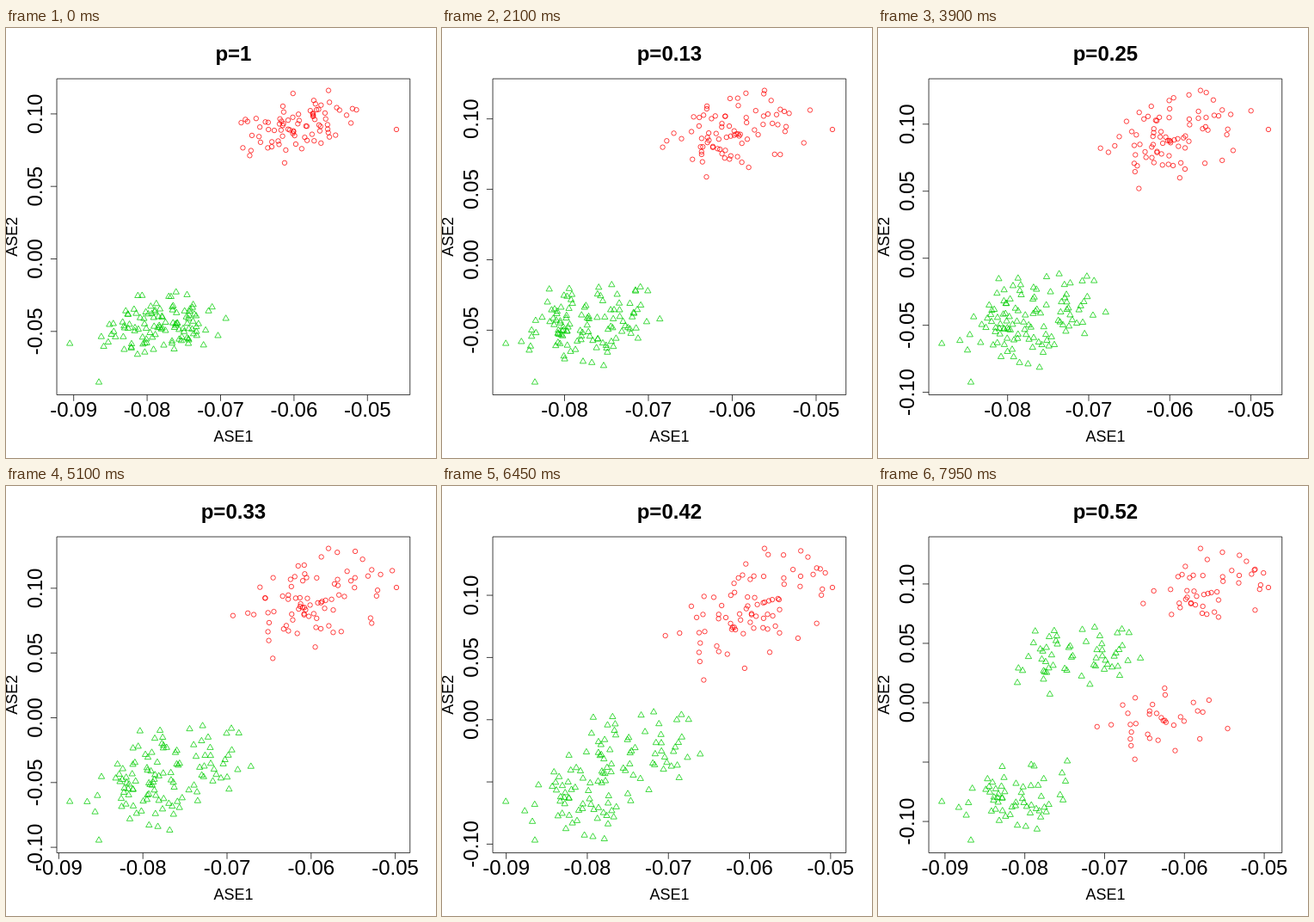
An HTML page for the animation above (8000 ms loop, 500 by 500 pixels).

```html
<!DOCTYPE html>
<html lang="en">
<head>
<meta charset="utf-8">
<title>ASE scatter plot</title>
<style>
html, body { margin: 0; height: 100%; overflow: hidden; background: #fff; }
svg { display: block; width: 100%; height: 100%; font: 24px "Liberation Sans", Arial, sans-serif; text-anchor: middle; }
path { fill: none; stroke-width: .75; }
</style>
</head>
<body>
<svg id="plot" viewBox="0 0 500 500"></svg>
<script>
const STEP = 150, LOOP = 8000;
const LEFT = 59.04, TOP = 59.04, RIGHT = 469.76, BOTTOM = 426.56;
const INSET = 15.2; // room between the outermost marks and the box
const TICK = 7.2;
const midX = (LEFT + RIGHT) / 2, midY = (TOP + BOTTOM) / 2;

// p, x of -0.07, px per 0.01, y of 0
const axisKeys = [
  [.13, 240, 97.5, 269.5], [.25, 245, 94.3, 267.7], [.33, 257, 97.8, 269.5],
  [.38, 261, 96.6, 273], [.46, 265.5, 92, 270.5], [.52, 263.5, 92.8, 252]
];

// Cluster centre in data units, share of the upper half, and its outermost marks in px
const red = { color: '#f00', x: -.0597, y: .0905, count: 80, share: .57, rim: [[454, 118], [375, 72.6]] };
const green = { color: '#00cd00', x: -.0776, y: -.0455, count: 116, share: .5, rim: [[74.2, 367], [108, 412]] };

let seed = 11;
function random() {
  seed = (seed * 1664525 + 1013904223) % 4294967296;
  return seed / 4294967296;
}

// Normal pair, cut off at about 2.3 deviations
function normalPair() {
  const r = Math.sqrt(-2 * Math.log(1 - .93 * random())), turn = 2 * Math.PI * random();
  return [r * Math.cos(turn), r * Math.sin(turn)];
}

for (const set of [red, green]) {
  set.dots = Array.from({ length: set.count }, (_, i) => ({
    side: i < set.count * set.share ? 1 : -1,
    pure: normalPair(),
    mixed: normalPair()
  }));
}

// Reflect a value back into its range
const fold = (v, lo, hi) => v < lo ? 2 * lo - v : v > hi ? 2 * hi - v : v;

function axesAt(p) {
  if (p === 1) return { x0: 249.5, xStep: 85.4, y0: 268.5, yStep: 84.3 };
  let i = 0;
  while (i < axisKeys.length - 2 && p > axisKeys[i + 1][0]) i++;
  const [a, b] = [axisKeys[i], axisKeys[i + 1]];
  const f = (p - a[0]) / (b[0] - a[0]);
  const [, x0, xStep, y0] = a.map((v, j) => v + (b[j] - v) * f);
  return { x0, xStep, y0, yStep: 86.2 - 33 * p };
}

// The second axis turns from the colour contrast to the half contrast as p passes 0.49
function points(set, p, axes) {
  const mix = p === 1 ? 0 : p;
  const turn = mix && .5 * Math.atan2(.04, .49 - mix);
  const cos = Math.cos(turn), sin = Math.sin(turn);
  const shift = .0034 * Math.min(1, (mix / .46) ** 2);
  const sd = (.011 + .02 * mix) * (1 - .4 * sin * sin);
  const cloud = set.dots.map(({ side, pure, mixed }) => {
    const [u, v] = p === 1 ? pure : mixed;
    const x = set.x + side * shift + .004 * u;
    const y = set.y * cos + side * .065 * sin + sd * (.25 * u + .97 * v);
    return [
      fold(axes.x0 + (x + .07) / .01 * axes.xStep, LEFT + INSET, RIGHT - INSET),
      fold(axes.y0 - y / .05 * axes.yStep, TOP + INSET, BOTTOM - INSET)
    ];
  });
  return cloud.concat(set.rim);
}

const circle = 'm-2.7 0a2.7 2.7 0 1 0 5.4 0a2.7 2.7 0 1 0-5.4 0';
const triangle = 'm0-4.2l3.64 6.3h-7.28z';
const line = (color, d) => `<path stroke="${color}" d="${d}"/>`;
const marks = (set, shape, p, axes) => line(set.color,
  points(set, p, axes).map(([x, y]) => `M${x.toFixed(2)} ${y.toFixed(2)}${shape}`).join(''));
const text = (x, y, s, more = '') => `<text x="${x}" y="${y}" ${more}>${s}</text>`;
const upright = (x, y, s, more = '') =>
  `<text transform="translate(${x} ${y}) rotate(-90)" ${more}>${s}</text>`;

function frame(n) {
  const p = n ? (n - 1) / 100 : 1;
  const axes = axesAt(p);
  let lines = `M${LEFT} ${TOP}H${RIGHT}V${BOTTOM}H${LEFT}z`, labels = '';
  for (let k = -2; k <= 3; k++) {
    const x = axes.x0 + k * axes.xStep, y = axes.y0 - k * axes.yStep;
    if (x > LEFT && x < RIGHT) {
      lines += `M${x} ${BOTTOM}v${TICK}`;
      labels += text(x, 452.4, ((k - 7) / 100).toFixed(2));
    }
    if (y > TOP && y < BOTTOM) {
      lines += `M${LEFT} ${y}h${-TICK}`;
      const crowded = k === -1 && axes.yStep < 74.6;
      if (!crowded) labels += upright(41.8, y, (k * .05).toFixed(2));
    }
  }
  return marks(red, circle, p, axes) + marks(green, triangle, p, axes) +
    line('#000', lines) + labels +
    text(midX, 38.1, 'p=' + p, 'font-weight="bold"') +
    text(midX, 481.2, 'ASE1', 'font-size="18"') +
    upright(13, midY, 'ASE2', 'font-size="18"');
}

const plot = document.getElementById('plot');
const start = performance.now();
let shown = -1;
function draw() {
  const n = Math.floor((performance.now() - start) % LOOP / STEP);
  if (n !== shown) plot.innerHTML = frame(shown = n);
  requestAnimationFrame(draw);
}
draw();
</script>
</body>
</html>
```
